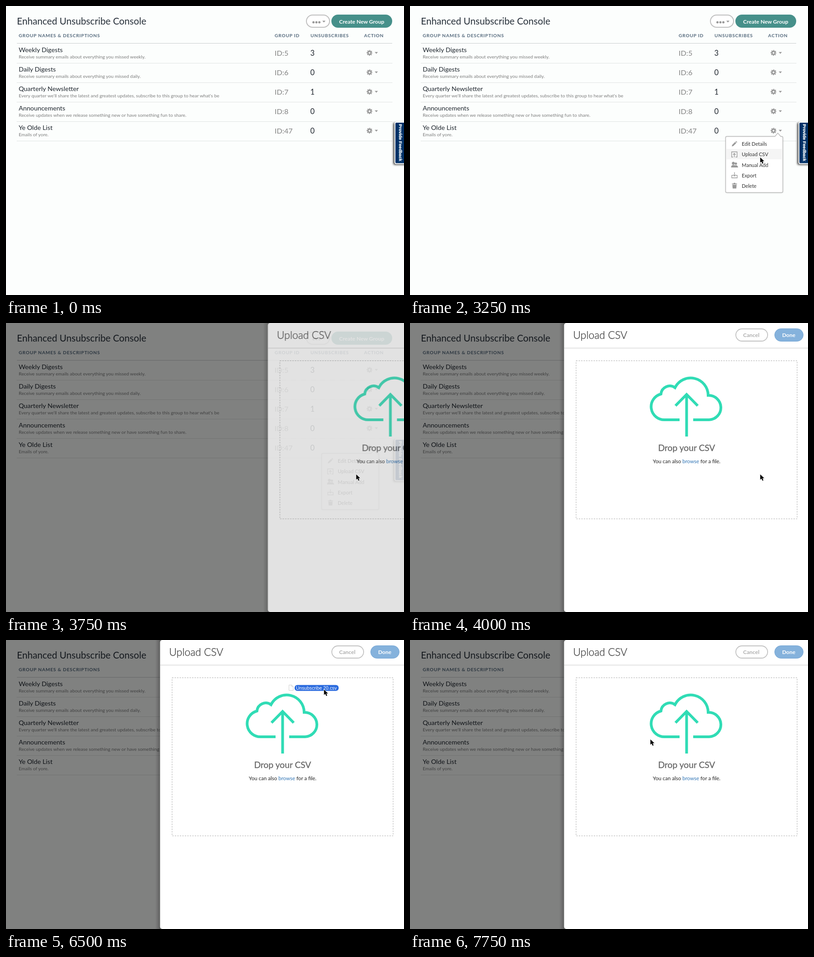
An HTML page that plays this animation: 877 px wide and 639 px high, repeating every 8000 ms.

```html
<!DOCTYPE html>
<html lang="en">
<head>
<meta charset="utf-8">
<title>Upload a CSV</title>
<style>
html, body { margin: 0; width: 100%; height: 100%; overflow: hidden; background: #fcfefd; }
svg { display: block; font-family: Lato, "Open Sans", sans-serif; }

#cursor, #menu, #hover, #dim, #panel, #file { animation: 8s step-end infinite; }
#cursor { animation-name: cursor; }
#menu { animation-name: menu; }
#hover { animation-name: hover; }
#dim { animation-name: dim; }
#panel { animation-name: panel; }
#file { animation-name: file; }

@keyframes cursor {
  0% { opacity: 0; transform: translate(663px, 274px); }
  12.5% { opacity: 1; transform: translate(663px, 274px); }
  15.625% { opacity: 1; transform: translate(672px, 312px); }
  18.75% { opacity: 1; transform: translate(710px, 327px); }
  21.875% { opacity: 1; transform: translate(775px, 329px); }
  25% { opacity: 1; transform: translate(816px, 277px); }
  28.125% { opacity: 1; transform: translate(819px, 282px); }
  31.25% { opacity: 1; transform: translate(812px, 284px); }
  34.375% { opacity: 1; transform: translate(790px, 316px); }
  37.5% { opacity: 1; transform: translate(770px, 332px); }
  40.625% { opacity: 1; transform: translate(771px, 334px); }
  53.125% { opacity: 1; transform: translate(828px, 387px); }
  56.25% { opacity: 0; transform: translate(828px, 387px); }
  81.25% { opacity: 1; transform: translate(700px, 109px); }
  84.375% { opacity: 1; transform: translate(574px, 123px); }
  87.5% { opacity: 1; transform: translate(540px, 166px); }
  90.625% { opacity: 1; transform: translate(524px, 210px); }
  93.75%, 100% { opacity: 1; transform: translate(529px, 219px); }
}
@keyframes menu {
  0% { opacity: 0; }
  25%, 100% { opacity: 1; }
}
@keyframes hover {
  0% { opacity: 0; transform: none; }
  34.375% { opacity: 1; transform: none; }
  37.5% { opacity: 1; transform: translateY(23px); }
  46.875%, 100% { opacity: 0; transform: none; }
}
@keyframes dim {
  0% { opacity: 0; }
  43.75% { opacity: .115; }
  46.875%, 100% { opacity: .495; }
}
@keyframes panel {
  0% { opacity: 0; transform: translateX(540px); }
  46.875% { opacity: .77; transform: translateX(237.5px); }
  50%, 100% { opacity: 1; transform: none; }
}
@keyframes file {
  0% { opacity: 0; transform: none; }
  81.25% { opacity: 1; transform: none; }
  84.375% { opacity: 1; transform: translate(-126px, 14px); }
  87.5% { opacity: 1; transform: translate(-160px, 57px); }
  90.625% { opacity: 1; transform: translate(-176px, 101px); }
  93.75% { opacity: .5; transform: translate(-181px, 110px); }
  96.875%, 100% { opacity: 0; transform: translate(-181px, 110px); }
}

.title { font-size: 20.7px; fill: #27303a; }
.head { font-size: 10.2px; font-weight: 700; letter-spacing: .78px; fill: #54697c; }
.name { font-size: 14.3px; fill: #1f262e; }
.about { font-size: 10.35px; fill: #7d7d7d; }
.id { font-size: 16.2px; fill: #858585; }
.count { font-size: 16.5px; fill: #222931; }
.label { font-size: 12px; font-weight: 700; fill: #fff; }
.muted { fill: #b0b0b0; }
.item { font-size: 11.1px; fill: #333; }
.small { font-family: "Liberation Sans", Arial, sans-serif; fill: #fff; }
.icon { fill: #999; }
.line { fill: none; stroke: #999; stroke-width: 1.3; }
</style>
</head>
<body>
<svg width="877" height="639" viewBox="0 0 877 639">
  <defs>
    <linearGradient id="edge">
      <stop offset="0" stop-opacity="0"/>
      <stop offset="1" stop-opacity=".34"/>
    </linearGradient>
    <filter id="soft" x="-50%" y="-20%" width="200%" height="140%">
      <feGaussianBlur stdDeviation="2"/>
    </filter>
    <g id="action">
      <circle r="3.4" fill="none" stroke="#999" stroke-width="2.8"/>
      <circle r="5.3" fill="none" stroke="#999" stroke-width="2.2" stroke-dasharray="2.3 1.863" stroke-dashoffset="1.15"/>
      <path class="icon" d="M11.5-2h7l-3.5 4z"/>
    </g>
  </defs>

  <rect width="877" height="639" fill="#fcfefd"/>
  <text class="title" x="24" y="41">Enhanced Unsubscribe Console</text>
  <rect x="662" y="20" width="51" height="27" rx="13.5" fill="#fff" stroke="#bfbfbf" stroke-width="2"/>
  <g class="icon">
    <circle cx="677.5" cy="36" r="2.5"/><circle cx="684" cy="36" r="2.5"/><circle cx="690.5" cy="36" r="2.5"/>
    <path d="M697 32.5h7l-3.5 4z"/>
  </g>
  <rect x="717" y="19" width="134" height="29" rx="14.5" fill="#46908a"/>
  <text class="label" x="734" y="38.5">Create New Group</text>
  <g class="head">
    <text x="28" y="68.7">GROUP NAMES &amp; DESCRIPTIONS</text>
    <text x="592" y="68.7">GROUP ID</text>
    <text x="671" y="68.7">UNSUBSCRIBES</text>
    <text x="789" y="68.7">ACTION</text>
  </g>
  <path d="M24 82.5H851" stroke="#c9cdcd"/>
  <g id="rows"></g>

  <rect x="853.5" y="258" width="30" height="93" rx="3" opacity=".75" filter="url(#soft)"/>
  <rect x="857" y="257" width="26" height="91.5" rx="3" fill="#003268" stroke="#fff" stroke-width="2"/>
  <text class="small" transform="translate(865.5 261) rotate(90)" font-weight="700" font-size="9.6" stroke="#fff" stroke-width=".35">Provide Feedback</text>

  <g id="menu">
    <rect x="696" y="289" width="125.5" height="124" rx="3" opacity=".15" filter="url(#soft)"/>
    <path d="M698 288.5H804L810.5 281 817 288.5H819Q821.5 288.5 821.5 291V410Q821.5 412.5 819 412.5H698Q695.5 412.5 695.5 410V291Q695.5 288.5 698 288.5Z" fill="#fff" stroke="#b9b9b9" stroke-width="1.4"/>
    <rect id="hover" x="696.2" y="293" width="124.6" height="23" fill="#f5f5f5"/>
    <g id="items"></g>
    <g class="icon">
      <path d="M709 310.5l1-3.5 6.5-6.5 2.5 2.5-6.5 6.5zM717.3 299.7l1.2-1.2 2.5 2.5-1.2 1.2z"/>
      <circle cx="718" cy="348.5" r="2.6"/><path d="M714 357q0-5 4-5t5 5z"/>
      <circle cx="712.5" cy="347.8" r="3.2"/><path d="M707.5 357q0-5.5 5-5.5t5.5 5.5z"/>
      <path d="M709.5 392.5h11v1.8h-11zM713 391h4v1.5h-4zM710.3 395.2h9.4l-.7 8.3h-8z"/>
    </g>
    <g class="line">
      <path d="M712 334h-3.3v-11.5h12v11.5h-3.3M714.7 334.5v-8M711.8 329l2.9-3 2.9 3"/>
      <path d="M712 374.5h-3v5.5h12v-5.5h-3M715 367.5v8.5M712.3 373.3l2.7 2.8 2.7-2.8"/>
    </g>
  </g>

  <rect id="dim" width="877" height="639"/>

  <g id="panel">
    <rect x="329" width="14" height="639" fill="url(#edge)"/>
    <rect x="339.5" width="560" height="639" rx="5" fill="#fff"/>
    <text x="359.5" y="34.5" font-size="22.9" font-weight="300" fill="#333" stroke="#333" stroke-width=".25">Upload CSV</text>
    <path d="M340 55.5H900" stroke="#d9d9d9" stroke-width="1.4"/>
    <rect x="718" y="13" width="70" height="27" rx="13.5" fill="#fff" stroke="#c2c2c2" stroke-width="1.8"/>
    <text class="label muted" x="734" y="31.3">Cancel</text>
    <rect x="803.5" y="12.5" width="63" height="28" rx="14" fill="#85b2dc" stroke="#76a6d4"/>
    <text class="label" x="820" y="31.3">Done</text>
    <rect x="366" y="83.5" width="487" height="349.5" fill="none" stroke="#a8a8a8" stroke-dasharray="3 2.5"/>
    <g fill="none" stroke="#30dcb5" stroke-width="6">
      <path d="M594 214H562A29 29 0 0 1 553 157A19.5 19.5 0 0 1 584 143A38.5 38.5 0 0 1 657 160A27 27 0 0 1 659 214H624"/>
      <path d="M609.5 251V158M585 183L609.5 158 634 183"/>
    </g>
    <text x="609.5" y="283" text-anchor="middle" font-size="19.2" fill="#666" stroke="#666" stroke-width=".3">Drop your CSV</text>
    <text x="609.5" y="310" text-anchor="middle" font-size="11.5" fill="#222">You can also <tspan fill="#2f74b5">browse</tspan> for a file.</text>
  </g>

  <g id="file">
    <path d="M623.5 99.5h6l3.5 3.5v8.5h-9.5zM629.5 99.5v3.5h3.5" fill="#fff" stroke="#d0d0d0"/>
    <rect x="636" y="99.5" width="97" height="13" rx="6" fill="#2869de"/>
    <text class="small" x="639" y="110.3" font-size="10.3">Unsubscribe 20.csv</text>
  </g>

  <path id="cursor" d="M.7 .8V12.6L3.5 10 5.6 14.7 7.8 13.7 5.7 9.2H9.6Z" stroke="#fff" stroke-width="1.2" paint-order="stroke"/>
</svg>
<script>
const groups = [
  ["Weekly Digests", "Receive summary emails about everything you missed weekly.", 5, 3],
  ["Daily Digests", "Receive summary emails about everything you missed daily.", 6, 0],
  ["Quarterly Newsletter", "Every quarter we'll share the latest and greatest updates, subscribe to this group to hear what's be", 7, 1],
  ["Announcements", "Receive updates when we release something new or have something fun to share.", 8, 0],
  ["Ye Olde List", "Emails of yore.", 47, 0]
];
const actions = ["Edit Details", "Upload CSV", "Manual Add", "Export", "Delete"];
const text = (style, x, y, value) => `<text class="${style}" x="${x}" y="${y}">${value}</text>`;

document.getElementById("rows").innerHTML = groups.map(([name, about, id, count], i) =>
  `<g transform="translate(0 ${83 + 43 * i})">` +
  text("name", 28, 18.7, name) +
  text("about", 28, 32.7, about) +
  text("id", 592, 27, "ID:" + id) +
  text("count", 670.5, 27, count) +
  `<use href="#action" x="801" y="20.7"/>
   <path d="M24 43.5H851" stroke="#c4c8c8" stroke-dasharray="1 1"/></g>`
).join("");

document.getElementById("items").innerHTML = actions.map((name, i) =>
  text("item", 731, 309.3 + 23.1 * i, name)
).join("");
</script>
</body>
</html>
```
